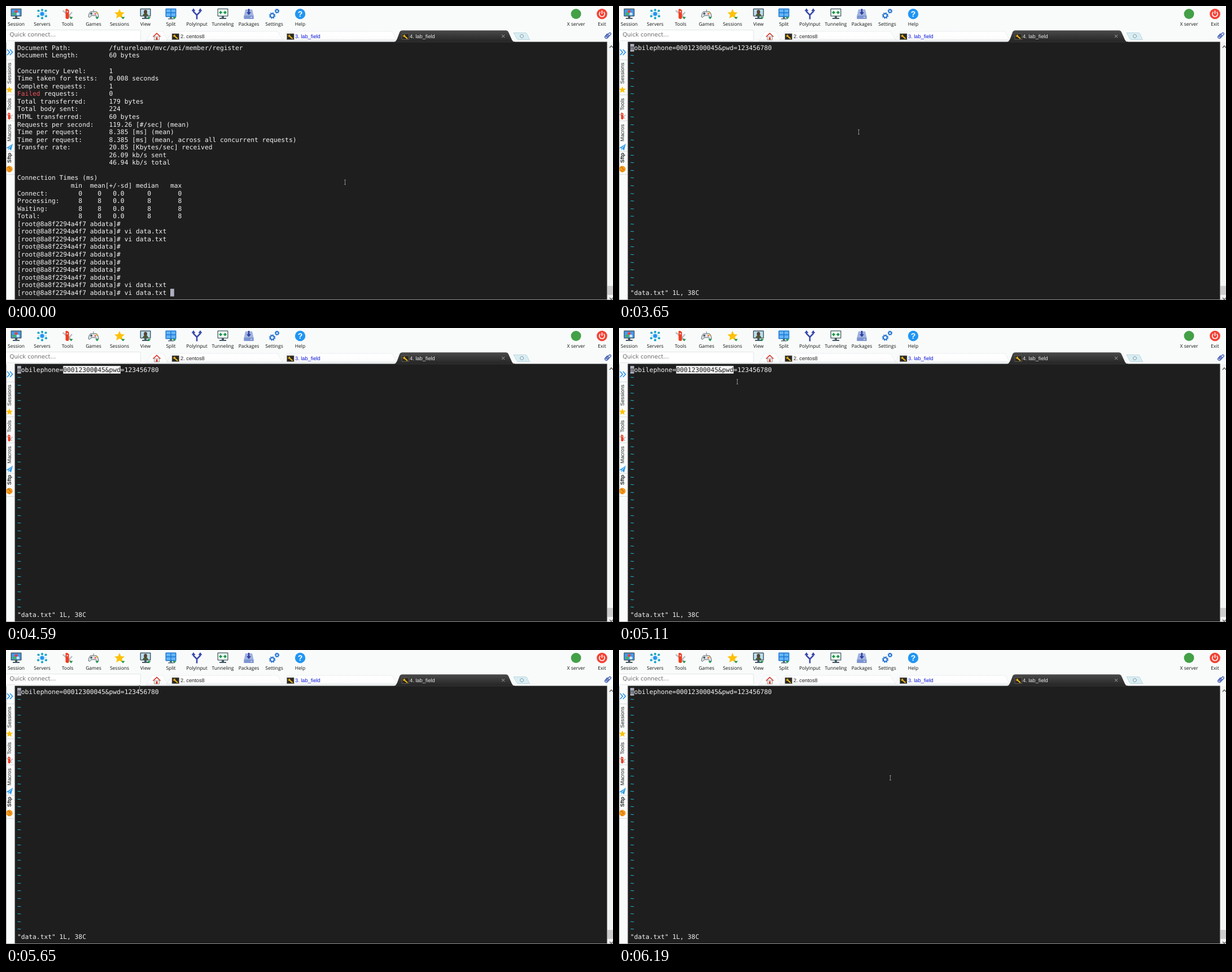
Animation, 1075 px wide and 521 px high, one loop 8000 ms. Source, as an HTML page:

```html
<!DOCTYPE html>
<html lang="en">
<head>
<meta charset="utf-8">
<title>Terminal session</title>
<style>
  html, body { margin: 0; width: 100%; height: 100%; overflow: hidden; background: #fff; }
  svg { display: block; width: 100vw; height: 100vh; }
  text { white-space: pre; text-rendering: geometricPrecision; }
  .label { font: 8.5px "Open Sans", sans-serif; text-anchor: middle; fill: #111; }
  .tab { font: 9.25px "Liberation Sans", Arial, sans-serif; }
  .term { font: 11.253px "DejaVu Sans Mono", monospace; }
  #pointer { mix-blend-mode: difference; }
</style>
</head>
<body>
<svg viewBox="0 0 1075 521" preserveAspectRatio="none">
  <defs>
    <linearGradient id="dark" x2="0" y2="1">
      <stop offset="0" stop-color="#4a4a4a"/><stop offset="1" stop-color="#242424"/>
    </linearGradient>
    <linearGradient id="pale" x2="0" y2="1">
      <stop offset="0" stop-color="#fff"/><stop offset=".75" stop-color="#fdfdfd"/><stop offset="1" stop-color="#e3e6e8"/>
    </linearGradient>
    <path id="star" d="M0-9 2.6-3.1 9-2.5 4.3 1.7 5.7 8 0 4.7-5.7 8-4.3 1.7-9-2.5-2.6-3.1Z" fill="#fdc107"/>
    <g id="knife">
      <path d="M-8.5-6 7 7M8-3 1 5" stroke="#b4bec6" stroke-width="2.4"/>
      <path d="M-3.5-8.5Q-1-10 2.5-6.5V7.5Q0 10.5-3.5 7.5Z" fill="#f03c20"/>
      <path d="M-1.7-4H.8M-.5-5.3V-2.7" stroke="#fff"/>
    </g>
    <g id="screen">
      <rect x="-9.5" y="-9.5" width="19" height="14" rx="1" fill="#455a64"/>
      <path d="M-2 4H2V7H6V9H-6V7H-2Z" fill="#455a64"/>
    </g>
    <path id="more" d="M3 5.5H9.5L6.25 9.5Z" fill="#159447"/>
    <g id="wrench">
      <rect width="12.5" height="10.5" x="-6" y="-5" fill="#2b2a22" stroke="#777" stroke-width=".6"/>
      <path d="M-3-2 4 4" stroke="#f6b91c" stroke-width="2"/>
      <circle cx="-2.2" cy="-1.6" r="2" fill="#f6b91c"/><circle cx="-3" cy="-2.5" r="1" fill="#2b2a22"/>
    </g>
  </defs>

  <rect width="1075" height="521" fill="#f9fbfb"/>
  <g id="toolbar"></g>

  <!-- tab strip -->
  <rect y="42" width="238" height="19" fill="#fff"/>
  <path d="M0 42.5H238M238.5 43V61M0 61.5H238" stroke="#e2e5e6" fill="none"/>
  <text x="6.5" y="53.6" font-size="10.1" font-family="DejaVu Sans, sans-serif" fill="#6b6b6b">Quick connect...</text>
  <g fill="url(#pale)" stroke="#e3e6e8" stroke-width=".7">
    <path d="M247 63 258 45H278L287 62"/>
    <path d="M284 62 294 45H481L490 61 488 62Z"/>
    <path d="M488 62 498 45H684L692 61 688 62Z"/>
  </g>
  <g transform="translate(267 54)">
    <path d="M-4.5 0H4.5V6H-4.5Z" fill="#f4f1ec" stroke="#777" stroke-width=".7"/>
    <path d="M-6.5.5 0-5.5 6.5.5" fill="none" stroke="#d5362c" stroke-width="1.7"/>
    <path d="M-1.5 1.5H1.5V6H-1.5Z" fill="#d5362c"/>
  </g>
  <path d="M688 64Q691.5 62 693.5 56L697 46.5Q698.5 43.2 702 43.2H885Q888.5 43.2 890 46.5L896 60Q897.5 63.3 901 64Z" fill="url(#dark)"/>
  <use href="#wrench" x="300" y="54"/><use href="#wrench" x="503.5" y="54"/><use href="#wrench" x="707" y="54"/>
  <g class="tab">
    <text x="309" y="56.7" fill="#222">2. centos8</text>
    <text x="512" y="56.7" fill="#0a14d8">3. lab_field</text>
    <text x="715" y="56.7" fill="#e8e8e8">4. lab_field</text>
  </g>
  <path d="M878 51 883 56M883 51 878 56" stroke="#bbb" stroke-width=".9"/>
  <path d="M899 47.5H920Q922 47.5 923 50L927.5 59.5H908Q905 59.5 904 57Z" fill="#d9eef3" stroke="#a9cbd4" stroke-width=".7"/>
  <path d="M913.5 50V57M910 53.5H917" stroke="#8aa9b5" stroke-width="3.4"/>
  <path d="M913.5 51V56M911 53.5H916" stroke="#fff" stroke-width="1.6"/>
  <path transform="translate(1066 52) rotate(42)" d="M-2.6-2V4A2.6 2.6 0 0 0 2.6 4V-4.5A1.8 1.8 0 0 0-1-4.5V3A.8.8 0 0 0 1 3V-2" fill="none" stroke="#2746a8" stroke-width="1.2"/>

  <!-- sidebar -->
  <path d="M0 64H16V521H0Z" fill="#fafcfc"/>
  <path d="M0 95.5H15M0 157.5H15M0 203.5H15M0 257.5H15M0 298.5H15" stroke="#d9dddf"/>
  <path d="M.5 64V521" stroke="#a8acae"/>
  <path d="M2 77 6.5 82 2 87M7 77 11.5 82 7 87" fill="none" stroke="#2a96f3" stroke-width="1.7"/>
  <g id="sidebar" class="tab" fill="#222"></g>
  <use href="#star" transform="translate(6 148.5) scale(.66)"/>
  <use href="#knife" transform="translate(6 195) scale(.68)"/>
  <path d="M0 252 12 244 9 256 5.5 253 4 256V252Z" fill="#2d9be8"/>
  <path d="M4 252 12 244 5.5 253Z" fill="#a8d8f8"/>
  <circle cx="6" cy="289" r="5.7" fill="#f39a1d"/>
  <path d="M2 286Q5 284 6 287T9 290M4 292 7 293" fill="none" stroke="#c66b09" stroke-width="1.2"/>

  <!-- scrollbar -->
  <rect x="1064" y="64" width="11" height="457" fill="#f3f4f4"/>
  <rect x="1065" y="496" width="10" height="16" fill="#cdcdcd"/>
  <path d="M1069 74 1072 70.5 1075 74M1069 517 1072 520 1075 517" fill="none" stroke="#555" stroke-width="1.3"/>

  <rect x="15.8" y="63.7" width="1048.5" height="456.6" fill="#1e1e1e" stroke="#6f7274" stroke-width=".7"/>
  <path d="M688 64H901" stroke="#242424" stroke-width="1.4"/>
  <path d="M0 520.6H1075" stroke="#8b8d8e" stroke-width=".8"/>
  <g id="report" class="term"></g>
  <g id="editor" class="term"></g>
  <path id="pointer" d="M-1.5-3.8H1.5M0-3.8V4.2M-1.5 4.2H1.5" fill="none" stroke="#c4c4c4" stroke-width=".8"/>
</svg>

<script>
const $ = id => document.getElementById(id);

const tools = [
  [18, 'Session', `<use href="#screen"/><path d="M-8-8H8V3H-8Z" fill="#3f9bf2"/><circle cx="0" cy="-4.5" r="2.6" fill="#e94436"/>
    <circle cx="-3.2" cy="0" r="2.6" fill="#45b649"/><circle cx="3.2" cy="0" r="2.6" fill="#cfe6fb"/>`],
  [64, 'Servers', `<path d="M-7-6 7 6M7-6-7 6M0-7V7M-8 0H8" stroke="#8fcbe8"/>
    <circle r="3.5" fill="#2196f3"/>` + [[-6.5, -5.5], [6.5, -5.5], [-7, 4], [7, 4], [0, 7.5], [0, -7]]
      .map(([x, y]) => `<circle cx="${x}" cy="${y}" r="2.1" fill="#12a5c4"/>`).join('')],
  [109, 'Tools', '<use href="#knife"/><use href="#more"/>'],
  [155, 'Games', `<path d="M-5-4H5Q8-3 9 5 7 8 4 3H-4Q-7 8-9 5-8-3-5-4Z" fill="#dfe5e8" stroke="#56646b"/>
    <path d="M0-4V-8" stroke="#777"/><path d="M-6-.5H-2M-4-2.5V1.5" stroke="#37474f" stroke-width="1.4"/>
    <circle cx="3" cy="0" r="1.3" fill="#f44336"/><circle cx="5.5" cy="-1.5" r="1.3" fill="#ffb300"/><use href="#more"/>`],
  [201, 'Sessions', '<use href="#star"/><use href="#more"/>'],
  [247, 'View', `<use href="#screen"/><path d="M-8-8H8V3H-8Z" fill="#b9def0"/>
    <path d="M-5 3Q-4-1 0-1T5 3Z" fill="#4d5a2d"/><ellipse cy="-3.5" rx="3" ry="3.8" fill="#5a4330"/><use href="#more"/>`],
  [292, 'Split', `<rect x="-9.5" y="-9.5" width="19" height="15" rx="1" fill="#1976d2"/>
    <path d="M-8-8H-.7V-2.7H-8ZM.7-8H8V-2.7H.7ZM-8-1.3H-.7V4H-8ZM.7-1.3H8V4H.7Z" fill="#64b5f6"/>
    <path d="M-2 5H2V8H5V9.5H-5V8H-2Z" fill="#546e7a"/><use href="#more"/>`],
  [338, 'PolyInput', `<path d="M0 9.5V2L-6-4V-7M0 2 6-4V-7" fill="none" stroke="#3949ab" stroke-width="2.6"/>
    <path d="M-9.5-5-6-10-2.5-5ZM2.5-5 6-10 9.5-5Z" fill="#3949ab"/>`],
  [384, 'Tunneling', `<use href="#screen"/><path d="M-8.2-8.2H8.2V3.2H-8.2Z" fill="#f4fbf5"/>
    <path d="M-7-2.5-3-6V-3.5H-1V-1.5H-3V1ZM7-2.5 3-6V-3.5H1V-1.5H3V1Z" fill="#159447"/>`],
  [430, 'Packages', `<path d="M-6-8H6L8.5 3V9H-8.5V3Z" fill="#9fb3e0"/><path d="M-8.5 3H8.5V9H-8.5Z" fill="#7d95d0"/>
    <path d="M-1.3-9H1.3V-3H4L0 2-4-3H-1.3Z" fill="#303f9f"/><path d="M3 6H6" stroke="#fff"/>`],
  [475, 'Settings', `<g fill="none" stroke="#1e6fd0"><circle cx="-3.5" cy="3" r="3.4" stroke-width="2"/>
    <circle cx="-3.5" cy="3" r="5" stroke-width="1.5" stroke-dasharray="1.96"/>
    <circle cx="5" cy="-5" r="2.4" stroke-width="1.6"/><circle cx="5" cy="-5" r="3.7" stroke-width="1.2" stroke-dasharray="1.45"/></g>`],
  [521, 'Help', `<circle r="9.2" fill="#2196f3"/>
    <text y="5" text-anchor="middle" font-family="Liberation Sans, sans-serif" font-weight="bold" font-size="14" fill="#fff">?</text>`],
  [1009.5, 'X server', '<circle r="9" fill="#43a047"/>'],
  [1055.5, 'Exit', `<circle r="9.3" fill="#f44336"/>
    <path d="M-3-3.5A4.7 4.7 0 1 0 3-3.5M0-6V0" fill="none" stroke="#fff" stroke-width="1.6"/>`],
];
$('toolbar').innerHTML = tools.map(([x, name, icon]) =>
  `<g transform="translate(${x} 14)">${icon}</g><text class="label" x="${x}" y="35.3">${name}</text>`).join('');

$('sidebar').innerHTML = [['Sessions', 138], ['Tools', 185], ['Macros', 240], ['Sftp', 278]].map(([name, y]) =>
  `<text transform="translate(9 ${y}) rotate(-90)"${name === 'Sftp' ? ' font-weight="bold"' : ''}>${name}</text>`).join('');

// Terminal grid
const LEFT = 20, CELL = 6.775, TOP = 67.2, ROW = 13.56;
const write = (row, col, text, fill = '#f4f4f4') =>
  `<text x="${LEFT + col * CELL}" y="${TOP + row * ROW + 10.7}" fill="${fill}">${text.replace(/&/g, '&amp;')}</text>`;
const block = (row, col, length, fill) =>
  `<rect x="${LEFT + col * CELL}" y="${TOP + row * ROW}" width="${length * CELL}" height="${ROW}" fill="${fill}"/>`;

const field = (name, value) => name.padEnd(24) + value;
const timing = (name, n) => `${name.padEnd(16)}${n}    ${n}   0.0      ${n}       ${n}`;
const prompt = '[root@8a8f2294a4f7 abdata]# ', vi = prompt + 'vi data.txt';
const lines = [
  field('Document Path:', '/futureloan/mvc/api/member/register'),
  field('Document Length:', '60 bytes'),
  '',
  field('Concurrency Level:', '1'),
  field('Time taken for tests:', '0.008 seconds'),
  field('Complete requests:', '1'),
  field('       requests:', '0'),
  field('Total transferred:', '179 bytes'),
  field('Total body sent:', '224'),
  field('HTML transferred:', '60 bytes'),
  field('Requests per second:', '119.26 [#/sec] (mean)'),
  field('Time per request:', '8.385 [ms] (mean)'),
  field('Time per request:', '8.385 [ms] (mean, across all concurrent requests)'),
  field('Transfer rate:', '20.85 [Kbytes/sec] received'),
  field('', '26.09 kb/s sent'),
  field('', '46.94 kb/s total'),
  '',
  'Connection Times (ms)',
  '              min  mean[+/-sd] median   max',
  timing('Connect:', 0), timing('Processing:', 8), timing('Waiting:', 8), timing('Total:', 8),
  prompt, vi, vi, ...Array(5).fill(prompt), vi, vi,
];
$('report').innerHTML = lines.map((line, row) => write(row, 0, line)).join('')
  + write(6, 0, 'Failed', '#f0525a') + block(32, 40, 1, '#adb0be');

const phone = '00012300045';
$('editor').innerHTML = write(0, 1, `obilephone=${phone}&pwd=123456780`)
  + block(0, 0, 1, '#adb0be') + write(0, 0, 'm', '#33343a')
  + `<g id="selection">${block(0, 12, 15, '#f4f4f4')}${write(0, 12, phone + '&pwd', '#1e1e1e')}</g>`
  + Array.from({ length: 31 }, (_, i) => write(i + 1, 0, '~', '#22c4e6')).join('')
  + write(32, 0, '"data.txt" 1L, 38C');

// Pointer stops: time, x, y; each is held until the next
const stops = [
  [0, 600.5, 312], [3650, 424.5, 223],
  [3800, 322, 160], [3920, 232, 108], [4040, 176, 80], [4160, 158.5, 74],
  [4870, 168, 83], [4990, 194, 99.5], [5110, 209.5, 95],
  [5260, 224.5, 82], [5410, 232, 74], [5530, 237, 69], [5650, 236.5, 67],
  [5800, 248.5, 83], [5950, 330, 135], [6070, 430, 198], [6190, 480.5, 226.5],
];
const show = (id, on) => $(id).setAttribute('visibility', on ? 'inherit' : 'hidden');

function draw(now) {
  const t = now % 8000;
  const [, x, y] = stops.findLast(([start]) => start <= t);
  const editing = t >= 560;
  $('pointer').setAttribute('transform', `translate(${x} ${y})`);
  show('report', !editing);
  show('editor', editing);
  show('selection', t >= 4590 && t < 5530);
  requestAnimationFrame(draw);
}
draw(0);
</script>
</body>
</html>
```
